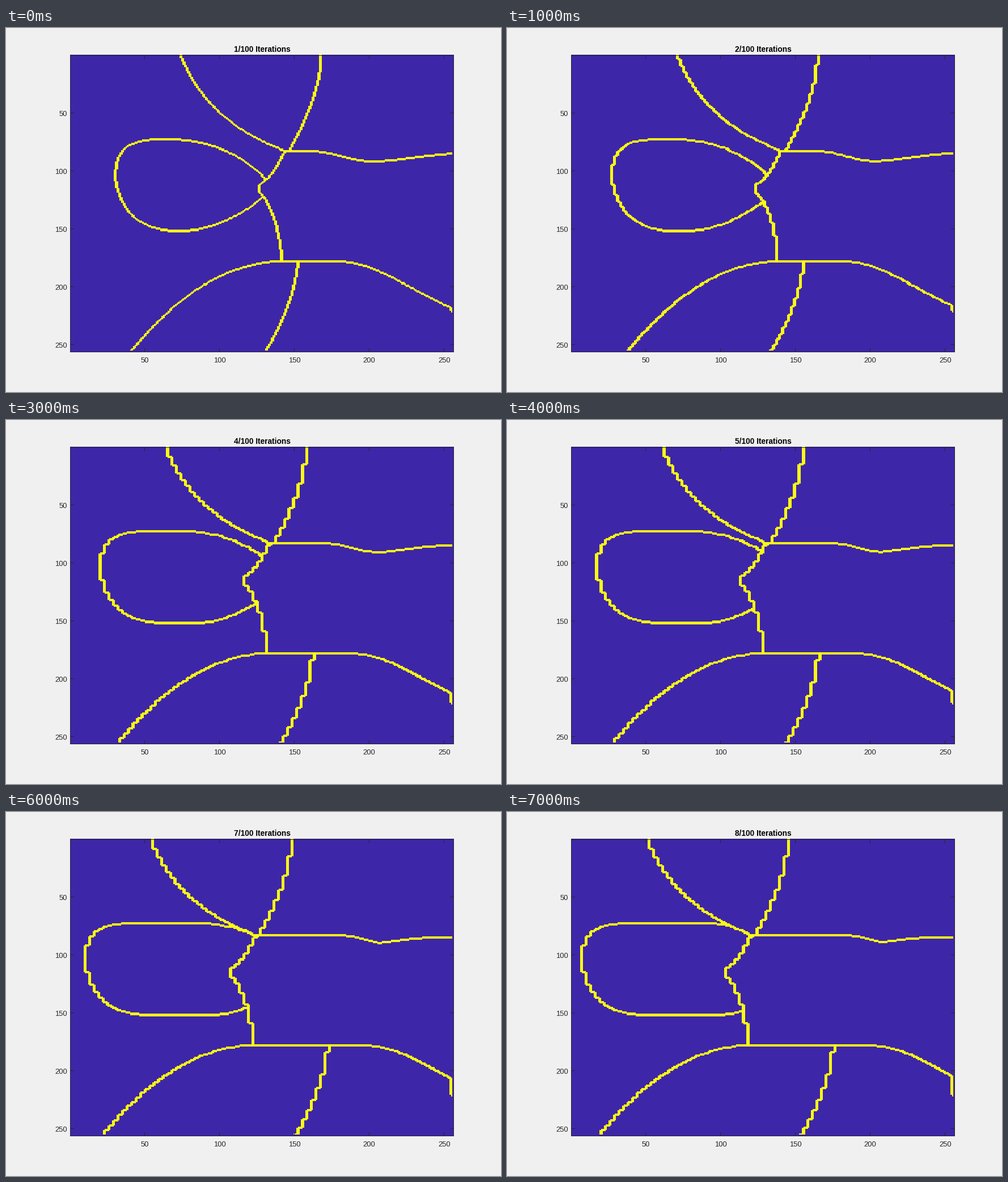
A matplotlib script that plays this animation: 873 by 641 pixels, repeating every 8 s.

```python
import numpy as np
import matplotlib.pyplot as plt
from matplotlib.animation import FuncAnimation
from matplotlib.colors import ListedColormap

W, H, DPI = 873, 641, 100
# plot box as fractions of the stage
X0, X1 = 0.13 * W, 0.905 * W
Y0, Y1 = 0.075 * H, 0.89 * H
N, STEPS = 256, 8
CW, RH = (X1 - X0) / N, (Y1 - Y0) / N   # size of one cell
INK = "#262626"
PT = 72 / DPI

y = (Y0 + (np.arange(N) + 0.5) * RH)[:, None]   # stage y of each row
cols = np.arange(N)


class Border:
    """Bezier pieces running downwards that drift sideways as stairs."""

    def __init__(self, drift, *pieces):
        t = np.linspace(0, 1, 200)[:, None]
        weights = np.hstack([(1 - t) ** 3, 3 * t * (1 - t) ** 2,
                             3 * t ** 2 * (1 - t), t ** 3])
        pts = np.vstack([weights @ np.array(p, float) for p in pieces])
        self.base = (np.interp(y, pts[:, 1], pts[:, 0]) - X0) / CW
        self.speed = drift / CW / (STEPS - 1)

    def at(self, k):
        """Column of the border in every row; stairs widen to three cells."""
        q = min(3, 1 + k)
        return q * np.round(self.base / q) + np.round(self.speed * k)


top_left = Border(-61, [(308, 48), (338, 125), (395, 180), (490, 216.5)])
top_mid = Border(-62, [(556, 48), (555, 110), (528, 165), (500, 216.5)])
zigzag = Border(-60, [(492, 217), (480, 240), (468, 268), (447, 276)],
                [(447, 290), (470, 310), (486, 370), (486, 412)])
loop_left = Border(-62, [(278, 197), (206, 197), (196, 221), (193, 260)],
                   [(193, 260), (197, 311), (228, 358), (300, 358)])
loop_right = Border(58, [(285, 197), (360, 197), (425, 226), (463, 273)],
                    [(457, 296), (425, 323), (370, 358), (310, 358)])
dip_left = Border(58, [(520, 217), (590, 217), (590, 235), (655, 236)])
dip_right = Border(-52, [(800, 221), (740, 224), (700, 233), (655, 236)])
arch_left = Border(-58, [(480, 411), (380, 418), (300, 475), (221, 570)])
arch_right = Border(56, [(580, 411), (650, 411), (700, 455), (790, 496)])
bottom_mid = Border(62, [(515, 411), (513, 460), (485, 530), (457, 570)])


def labels(k):
    """Region map after k steps; later regions cover earlier ones."""
    lab = np.zeros((N, N), int)
    upper, lower = y < 217.3, y > 411.5
    middle = ~upper & ~lower

    loop = (y > 196.5) & (y < 358)
    lab[loop & (cols >= loop_left.at(k)) & (cols < loop_right.at(k))] = 1
    lab[upper & (cols >= top_left.at(k))] = 2
    lab[upper & (cols >= top_mid.at(k))] = 3
    lab[middle & (cols >= zigzag.at(k))] = 4

    dip = ~upper & (y < 236) & (cols >= dip_left.at(k))
    lab[dip & ((cols < dip_right.at(k)) | (y < 221.4))] = 3

    # the last columns never grow
    right = np.where(y < 500, np.minimum(arch_right.at(k), N - 2), N)
    ground = lower & (cols >= arch_left.at(k))
    lab[lower & (cols >= right)] = 4
    lab[ground & (cols < right)] = 5
    lab[ground & (cols < bottom_mid.at(k))] = 6
    return lab


def edges(lab):
    """Mark the cells on both sides of every label change."""
    out = np.zeros((N, N))
    dx = lab[:, 1:] != lab[:, :-1]
    dy = lab[1:] != lab[:-1]
    out[:, 1:][dx] = 1
    out[:, :-1][dx] = 1
    out[1:][dy] = 1
    out[:-1][dy] = 1
    out[-1] = 0
    out[:, -1] = 0
    return out


plt.rcParams["font.family"] = "Liberation Sans"
fig = plt.figure(figsize=((W + 0.001) / DPI, (H + 0.001) / DPI), dpi=DPI,
                 facecolor="#f0f0f0")
ax = fig.add_axes([0, 0, 1, 1])
ax.axis("off")

maps = [edges(labels(k)) for k in range(STEPS)]
img = ax.imshow(maps[0], cmap=ListedColormap(["#3e26a8", "#f9fb15"]),
                vmin=0, vmax=1, extent=(X0, X1, Y1, Y0),
                interpolation="nearest", aspect="auto")
ax.set_xlim(0, W)
ax.set_ylim(H, 0)


def line(xs, ys):
    ax.plot(xs, ys, color=INK, lw=PT, solid_capstyle="projecting", snap=False)


def pixel(v):
    return np.floor(v) + 0.5


L, R, T, B = pixel(X0), pixel(X1) - 1, pixel(Y0), pixel(Y1)
line([L, R, R, L, L], [T, T, B, B, T])
for v in range(50, 251, 50):
    tx, ty = X0 + (v - 0.5) * CW, Y0 + (v - 0.5) * RH
    px, py = pixel(tx), pixel(ty)
    for a, b in ((T, T + 6), (B, B - 6)):
        line([px, px], [a, b])
    for a, b in ((L, L + 6), (R, R - 6)):
        line([a, b], [py, py])
    ax.text(tx, 588.5, str(v), size=13 * PT, color=INK, ha="center")
    ax.text(108, ty + 5.7, str(v), size=13 * PT, color=INK, ha="right")

title = ax.text((X0 + X1) / 2, 41.5, "", size=13.7 * PT, weight="bold",
                color="black", ha="center")


def update(k):
    img.set_data(maps[k])
    title.set_text(f"{k + 1}/100 Iterations")
    return img, title


anim = FuncAnimation(fig, update, frames=STEPS, interval=1000, repeat=True,
                     repeat_delay=0)
plt.show()
```
